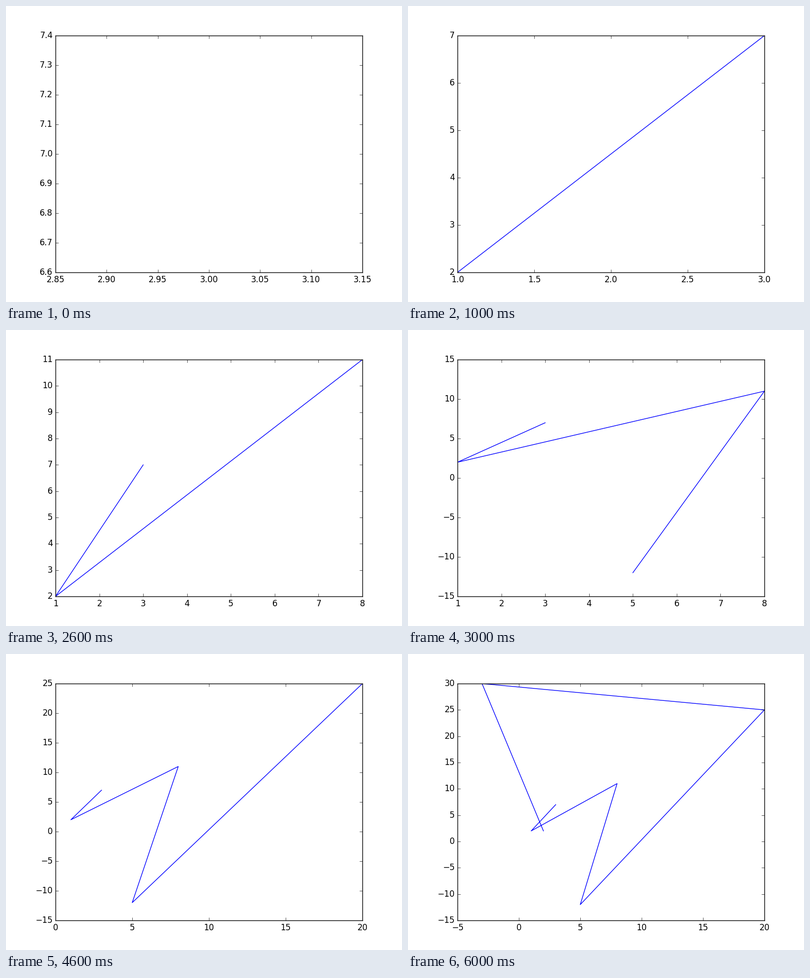
Animation of 800 by 600 pixels, one loop 7 s. Source, as a matplotlib script:

```python
import matplotlib.pyplot as plt
import numpy as np
from matplotlib.animation import FuncAnimation

# The classic style rounds the autoscaled limits out to whole ticks.
plt.style.use("classic")
plt.rcParams.update({
    "font.family": "DejaVu Sans",
    "figure.facecolor": "white",
    "savefig.facecolor": "white",
    "ytick.alignment": "center",
})

POINTS = np.array([(3, 7), (1, 2), (8, 11), (5, -12), (20, 25), (-3, 30), (2, 2)])

fig, ax = plt.subplots(figsize=(8, 6), dpi=100)
line, = ax.plot([], [], color="blue", lw=1)


def update(i):
    """Show the path up to point i, with the axes fitted to it."""
    line.set_data(*POINTS[:i + 1].T)
    ax.relim()
    ax.autoscale_view()
    return line,


anim = FuncAnimation(fig, update, frames=len(POINTS), interval=1000,
                     init_func=lambda: update(0), repeat=True, repeat_delay=0,
                     blit=False)
plt.show()
```
